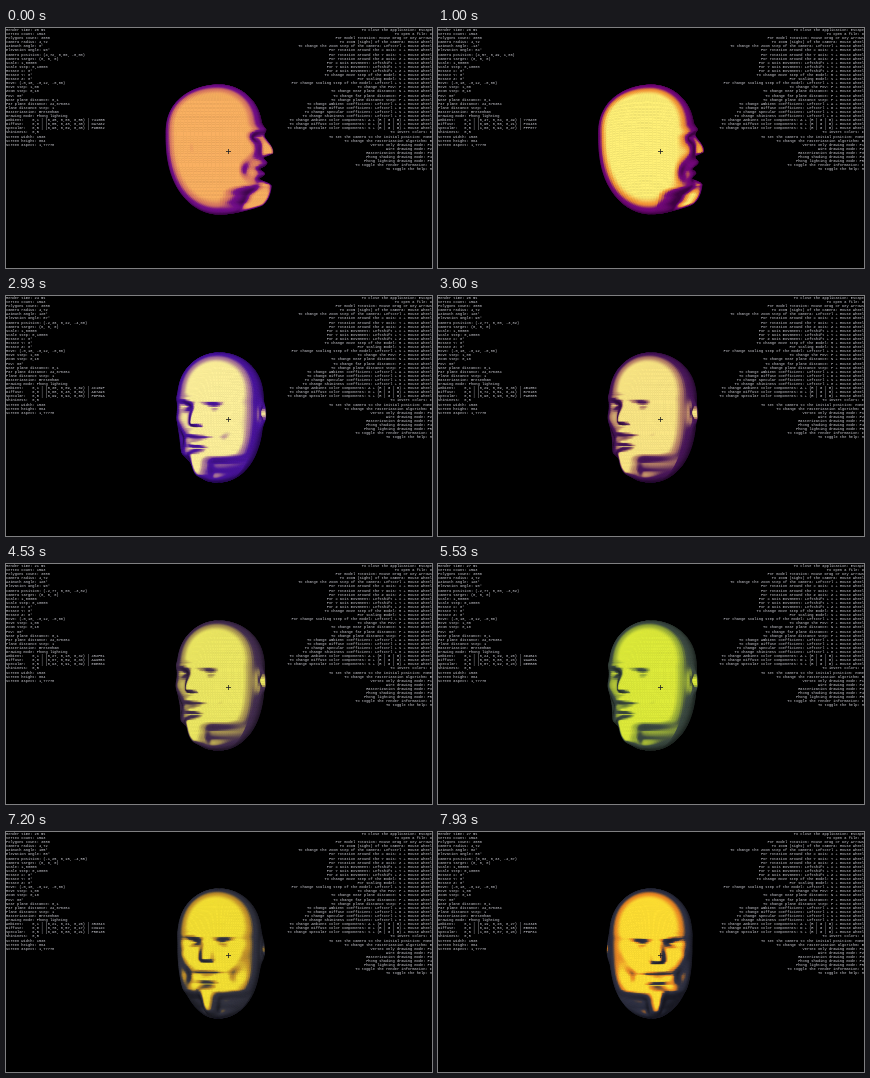
An HTML page with a canvas that plays this animation: 426x240 px, repeating every 8000 ms.

```html
<!DOCTYPE html>
<html lang="en">
<head>
<meta charset="utf-8">
<title>Head render</title>
<style>
html, body { margin: 0; width: 100%; height: 100%; overflow: hidden; background: #000; }
canvas { display: block; width: 426px; height: 240px; }
</style>
</head>
<body>
<canvas id="stage"></canvas>
<script>
const LOOP = 8000, STEP = 200 / 3;
const ROWS = 110, COLS = 100;
const CENTER = { x: 213, y: 121 };
const canvas = document.getElementById('stage');
const ctx = canvas.getContext('2d');
const ratio = window.devicePixelRatio || 1;
canvas.width = 426 * ratio;
canvas.height = 240 * ratio;

// Head direction in degrees and the colors from dark to bright.
const keys = [
  { at: 0, yaw: 90, pitch: 0, colors: ['#74108b', '#da7a62', '#f9b062'] },
  { at: 1000, yaw: 103, pitch: 6, colors: ['#770a7e', '#f39436', '#fff077'] },
  { at: 2270, yaw: -25, pitch: 5, colors: ['#4c14d8', '#a474be', '#fff9ac'] },
  { at: 3530, yaw: -36, pitch: 0, colors: ['#4b185c', '#b78168', '#fae685'] },
  { at: 5530, yaw: -36, pitch: 0, colors: ['#3d4b43', '#9aae3a', '#deeb3b'] },
  { at: 6530, yaw: -36, pitch: 0, colors: ['#383841', '#9f9931', '#ede335'] },
  { at: 7930, yaw: 8, pitch: 4, colors: ['#313345', '#eb8826', '#ffdf34'] }
];

const clamp = v => Math.min(1, Math.max(0, v));
const lerp = (a, b, u) => a + (b - a) * u;
const mix = (a, b, u) => a.map((v, i) => lerp(v, b[i], u));
const smooth = (a, b, v) => { const u = clamp((v - a) / (b - a)); return u * u * (3 - 2 * u); };
const bump = (d, width) => Math.exp(-((d / width) ** 2));
const parse = hex => [1, 3, 5].map(i => parseInt(hex.slice(i, i + 2), 16));

// Half size of a horizontal slice; the crown is at 57, the neck ends at 186.
function section(y, size, power) {
  const t = y < 106 ? ((106 - y) / 49) ** 2.4 : ((y - 106) / 80) ** power;
  return size * Math.sqrt(Math.max(0, 1 - t));
}

// Facial relief over the plain skull; a is the angle away from the nose.
function relief(a, y) {
  const brow = 4 * bump(y - 102, 4) * bump(a, 0.75);
  const socket = -6 * bump(y - 109, 4.5) * bump(a - 0.42, 0.24);
  const nose = 11 * smooth(102, 124, y) * smooth(130, 125, y) * bump(a, 0.15);
  const cheek = 2 * bump(y - 122, 7) * bump(a - 0.7, 0.25) - 4 * bump(y - 142, 9) * bump(a - 0.78, 0.25);
  const lips = 5 * bump(y - 135, 4) * bump(a, 0.38) + 3 * bump(y - 146, 2.5) * bump(a, 0.25);
  const mouth = -3 * bump(y - 141, 2) * bump(a, 0.42) - 3 * bump(y - 151, 2.5) * bump(a, 0.4);
  const beard = 10 * smooth(151, 158, y) * smooth(185, 176, y) * bump(a, 0.25);
  const neck = -10 * smooth(156, 167, y) * smooth(186, 174, y) * (1 - bump(a, 0.3)) * Math.max(0, Math.cos(a));
  const ear = 6 * bump(y - 118, 11) * bump(a - 1.92, 0.17) - 6 * bump(y - 117, 6) * bump(a - 1.88, 0.08);
  return brow + socket + nose + cheek + lips + mouth + beard + neck + ear;
}

function vertex(row, col) {
  const y = 57 + 129 * (1 - Math.cos(Math.PI * row / ROWS)) / 2;
  const s = Math.PI * (2 * col / COLS - 1);
  const a = s - 0.5 * Math.sin(s);
  const depth = Math.cos(a) > 0 ? section(y, 43, 8) : section(y, 53, 2.4);
  const height = relief(Math.abs(a), y);
  return {
    x: Math.sin(a) * (section(y, 41, 3) + height),
    y: y - CENTER.y,
    z: Math.cos(a) * (depth + height),
    height
  };
}

const mesh = Array.from({ length: ROWS + 1 }, (_, row) =>
  Array.from({ length: COLS + 1 }, (_, col) => vertex(row, col)));

const wheel = ' + Mouse Wheel';
const axes = ['X', 'Y', 'Z'];
const lights = ['Ambient', 'Diffuse', 'Specular'];
const help = [
  'To close the application: Escape',
  'To open a file: O',
  'For model rotation: Mouse Drag or Key Arrows',
  'To zoom (sight) of the camera: Mouse Wheel',
  'To change the zoom step of the camera: LeftCtrl' + wheel,
  ...axes.map(a => `For rotation around the ${a} axis: ${a}${wheel}`),
  ...axes.map(a => `For ${a} axis movement: LeftShift + ${a}${wheel}`),
  'To change move step of the model: M' + wheel,
  'For scaling model: S' + wheel,
  'For change scaling step of the model: LeftCtrl + S' + wheel,
  'To change the FOV: F' + wheel,
  'To change near plane distance: N' + wheel,
  'To change far plane distance: F' + wheel,
  'To change plane distance step: P' + wheel,
  ...lights.map(l => `To change ${l} coefficient: LeftCtrl + ${l[0]}${wheel}`),
  'To change Shininess coefficient: LeftCtrl + H' + wheel,
  ...lights.map(l => `To change ${l} color components: ${l[0]} + (R | G | B)${wheel}`),
  'To invert colors: I',
  'To set the camera to the initial position: Home',
  'To change the rasterization algorithm: B',
  ...['Vertex only', 'Wire', 'Rasterization', 'Phong shading', 'Phong lighting']
    .map((m, i) => `${m} drawing mode: F${i + 1}`),
  'To toggle the render information: I',
  'To toggle the help: H'
];

function stateAt(t) {
  const next = keys.findIndex(k => k.at > t);
  const b = keys.at(next), a = next > 0 ? keys[next - 1] : b;
  const u = smooth(a.at, b.at + (a === b), t);
  return {
    yaw: lerp(a.yaw, b.yaw, u),
    pitch: lerp(a.pitch, b.pitch, u),
    colors: a.colors.map((c, i) => mix(parse(c), parse(b.colors[i]), u))
  };
}

function info(t, { yaw, pitch, colors }) {
  const num = v => v.toFixed(2).replace('.', ',');
  const turn = yaw * Math.PI / 180, rise = pitch * Math.PI / 180, radius = 4.72;
  const eye = [Math.sin(turn) * Math.cos(rise), Math.sin(rise), -Math.cos(turn) * Math.cos(rise)];
  const lightRow = (name, i) => {
    const hex = colors[i].map(v => Math.round(v).toString(16).padStart(2, '0')).join('').toUpperCase();
    return `${(name + ':').padEnd(12)}0,${[1, 8, 5][i]} | (${colors[i].map(v => num(v / 255)).join(', ')}) | ${hex}`;
  };
  return [
    `Render time: ${20 + Math.round(t / STEP) * 7 % 9} ms`, 'Vertex count: 1593', 'Polygons count: 3086',
    `Camera radius: ${num(radius)}`, `Azimuth angle: ${Math.round(90 - yaw)}°`,
    `Elevation angle: ${Math.round(90 - pitch)}°`,
    `Camera position: (${eye.map(v => num(v * radius)).join(', ')})`, 'Camera target: (0, 0, 0)',
    'Scale: 1,00000', 'Scale step: 0,10000', ...axes.map(x => `Rotate ${x}: 0°`),
    'Move: (-0,18, -0,12, -0,06)', 'Move step: 1,00', 'Zoom step: 0,10', 'FOV: 60°',
    'Near plane distance: 0,1', 'Far plane distance: 24,676384', 'Plane distance step: 1',
    'Rasterization: Bresenham', 'Drawing mode: Phong lighting', ...lights.map(lightRow),
    'Shininess:  0,5', 'Screen width: 1536', 'Screen height: 864', 'Screen aspect: 1,77778'
  ];
}

function drawLines(lines, align, x) {
  ctx.textAlign = align;
  lines.forEach((line, i) => ctx.fillText(line, x, 2 + i * 4.1));
}

function rotate(p, yaw, pitch) {
  const x = p.x * Math.cos(yaw) + p.z * Math.sin(yaw);
  const z = p.z * Math.cos(yaw) - p.x * Math.sin(yaw);
  return {
    x: CENTER.x + x,
    y: CENTER.y + p.y * Math.cos(pitch) + z * Math.sin(pitch),
    z: z * Math.cos(pitch) - p.y * Math.sin(pitch),
    height: p.height
  };
}

function tone(light, [shade, mid, lit]) {
  const dark = mix(shade.map(v => v * 0.55), shade, smooth(0, 0.45, light));
  const c = mix(mix(dark, mid, smooth(0.42, 0.6, light)), lit, smooth(0.58, 0.76, light));
  return `rgb(${c.map(Math.round).join()})`;
}

// Visible facet with its brightness, or null when it faces away.
function facet(a, b, c, d) {
  const ux = c.x - a.x, uy = c.y - a.y, uz = c.z - a.z;
  const vx = d.x - b.x, vy = d.y - b.y, vz = d.z - b.z;
  const nx = uy * vz - uz * vy, ny = uz * vx - ux * vz, nz = ux * vy - uy * vx;
  if (nz <= 0) return null;
  const facing = (nz - 0.1 * nx - 0.12 * ny) / Math.hypot(nx, ny, nz);
  return { corners: [a, b, c, d], z: a.z + c.z, light: facing + 0.035 * Math.min(0, a.height) };
}

function drawHead({ yaw, pitch, colors }) {
  const rad = Math.PI / 180;
  const grid = mesh.map(row => row.map(p => rotate(p, yaw * rad, pitch * rad)));
  const facets = [];
  for (let i = 0; i < ROWS; i++)
    for (let j = 0; j < COLS; j++) {
      const f = facet(grid[i][j], grid[i][j + 1], grid[i + 1][j + 1], grid[i + 1][j]);
      if (f) facets.push(f);
    }
  facets.sort((a, b) => a.z - b.z);
  ctx.lineWidth = 0.6;
  for (const { corners, light } of facets) {
    ctx.fillStyle = ctx.strokeStyle = tone(light, colors);
    ctx.beginPath();
    for (const p of corners) ctx.lineTo(p.x, p.y);
    ctx.closePath();
    ctx.fill();
    ctx.stroke();
  }
}

function drawPointer() {
  ctx.fillStyle = '#222';
  ctx.fillRect(220, 123, 5, 0.8);
  ctx.fillRect(222.1, 121, 0.8, 5);
}

function draw(tick) {
  const t = tick * STEP;
  const state = stateAt(t);
  ctx.setTransform(ratio, 0, 0, ratio, 0, 0);
  ctx.fillStyle = '#000';
  ctx.fillRect(0, 0, 426, 240);
  drawHead(state);
  drawPointer();
  ctx.font = '3.67px "Liberation Mono", monospace';
  ctx.textBaseline = 'middle';
  ctx.fillStyle = '#d4d4dc';
  drawLines(info(t, state), 'left', 0);
  drawLines(help, 'right', 426);
}

const start = performance.now();
let shown = -1;
function loop() {
  const tick = Math.floor(((performance.now() - start) % LOOP) / STEP + 1e-6);
  if (tick !== shown) draw(shown = tick);
  requestAnimationFrame(loop);
}
loop();
</script>
</body>
</html>
```
